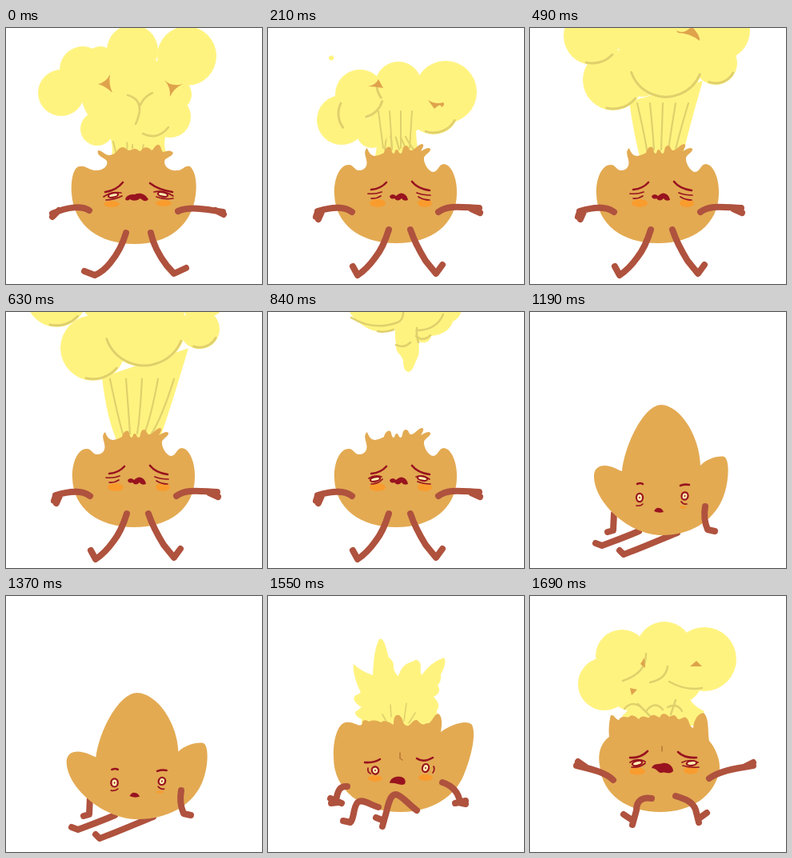
An HTML page with a canvas that plays this animation: 320x320 px, repeating every 1760 ms.

```html
<!DOCTYPE html>
<html lang="en">
<head>
<meta charset="utf-8">
<title>Popping kernel</title>
<style>
html, body { margin: 0; width: 100%; height: 100%; overflow: hidden; background: #fff; }
canvas { display: block; width: 320px; height: 320px; }
</style>
</head>
<body>
<canvas id="stage" width="320" height="320"></canvas>
<script>
const ctx = document.getElementById('stage').getContext('2d');
const C = {
  body: '#e3aa52', puff: '#fff380', shade: '#e0d06c', limb: '#af523e',
  ink: '#98131f', cheek: '#f99c2e', eye: '#fff3b4', spot: '#dfa34c'
};

const fill = (color, d) => { ctx.fillStyle = color; ctx.fill(new Path2D(d)); };
const line = (color, width, d) => {
  ctx.strokeStyle = color;
  ctx.lineWidth = width;
  ctx.stroke(new Path2D(d));
};
const oval = (color, x, y, rx, ry, turn = 0) => {
  ctx.fillStyle = color;
  ctx.beginPath();
  ctx.ellipse(x, y, rx, ry, turn, 0, 7);
  ctx.fill();
};
// Draws with a scale about (cx, cy) and a shift.
function placed(cx, cy, sx, sy, dx, dy, draw) {
  ctx.save();
  ctx.translate(cx + dx, cy + dy);
  ctx.scale(sx, sy);
  ctx.translate(-cx, -cy);
  draw();
  ctx.restore();
}
const lobes = list => list.forEach(([x, y, r]) => oval(C.puff, x, y, r, r));
const arc = ([x, y, r], from, to) => {
  ctx.strokeStyle = C.shade;
  ctx.lineWidth = 3;
  ctx.beginPath();
  ctx.arc(x, y, r - 2, from, to);
  ctx.stroke();
};

// ---- Faces ----
const smallMouth = 'M152 210Q156 206 160 210Q166 204 171 208Q174 210 175 215Q169 217 167 213Q162 218 158 213Q153 215 152 210Z';
const faces = {
  wail: {
    brows: 'M124 205Q138 203 146 193M180 194Q190 202 208 205',
    lines: 'M122 211Q131 204 144 206M125 215Q135 215 145 210M185 205Q196 202 209 210M188 211Q198 215 209 213',
    eyes: [[134, 209, 6, 2.5, -.2], [196, 208, 6, 2.5, .2]],
    mouth: 'M149 214C151 208 157 208 161 208C167 205 174 207 178 214C175 218 171 216 168 213C162 217 158 216 155 214Q151 217 149 214Z',
    cheeks: [[132, 220, 10, 4], [197, 219, 10, 4]]
  },
  shut: {
    brows: 'M129 202Q141 201 148 193M180 192Q187 201 202 203',
    lines: 'M125 207Q134 208 142 205M129 213Q135 214 141 210M186 206Q193 209 203 209M188 211Q194 215 202 215',
    eyes: [],
    mouth: smallMouth,
    cheeks: [[137, 219, 10, 5], [196, 219, 9, 5]]
  },
  dazed: {
    brows: 'M129 202Q141 201 148 193M180 192Q187 201 202 203',
    lines: 'M126 208Q133 203 142 206M129 215Q138 215 143 209M185 206Q194 203 202 209M187 212Q194 215 203 215',
    eyes: [[134, 209, 6, 2.5, -.2], [193, 208, 6, 2.5, .2]],
    mouth: smallMouth,
    cheeks: [[137, 219, 10, 5], [196, 219, 9, 5]]
  },
  tired: {
    brows: 'M134 215Q138 213 141 215M188 217Q193 215 199 216',
    lines: 'M133 242Q138 243 141 240M189 237Q192 241 196 240',
    eyes: [[137, 232, 3.8, 5, 0], [193.5, 230, 3.8, 4.5, .2]],
    mouth: 'M155 249Q158 244 161 245Q165 245 167 250Q161 252 155 249Z',
    cheeks: [[191, 244, 4, 1.5]]
  },
  worry: {
    brows: 'M121 208Q132 209 140 204M186 203Q194 209 206 202',
    lines: 'M125 215Q124 220 128 222M207 213Q209 217 206 221',
    eyes: [[134, 218, 4, 4.4, -.3], [197, 215, 3.8, 4.8, .3]],
    mouth: 'M152 234C153 227 160 225 166 226C171 227 173 231 171 235C165 238 161 233 152 234Z',
    cheeks: [[134, 228, 9, 4], [197, 227, 9, 4]],
    nose: 'M165 196L165 203L168 205'
  },
  howl: {
    brows: 'M125 202Q138 203 147 194M185 195Q193 203 208 202',
    lines: 'M125 208Q134 202 144 207M127 214Q137 215 144 209M190 208Q200 203 210 208M191 212Q200 215 211 214',
    eyes: [[134, 209, 6, 2.7, -.25], [202, 209, 6, 2.7, -.1]],
    mouth: 'M152 215C155 208 161 211 166 209C173 208 179 213 179 219C174 224 169 219 165 221C160 222 160 216 152 215Z',
    cheeks: [[134, 219, 10, 4.5], [201, 218, 9, 4.5]],
    nose: 'M165 188L165 194'
  }
};
function drawFace(f) {
  f.cheeks.forEach(c => oval(C.cheek, ...c));
  if (f.nose) line('#bb7635', 1.5, f.nose);
  line(C.ink, 2.6, f.brows);
  line(C.ink, 1.7, f.lines);
  f.eyes.forEach(([x, y, rx, ry, turn]) => {
    oval(C.ink, x, y, rx + 1.3, ry + 1.3, turn);
    oval(C.eye, x, y, rx - .9, ry - .9, turn);
    if (ry > 4) oval(C.ink, x, y, .8, 1.3);
  });
  fill(C.ink, f.mouth);
}

// ---- Bodies and limbs ----
const poses = {
  blast: {
    body: 'M82 207C81 190 84 174 92 173C99 171 104 178 113 178C122 178 128 172 126 166C121 161 113 160 115 153C120 153 123 158 128 159C133 159 137 157 140 152C144 148 148 148 151 152C154 155 157 151 161 151C166 151 166 156 169 153C172 147 179 149 182 153C185 152 186 145 191 146C195 148 193 154 197 155C201 154 205 152 209 156C207 162 199 161 198 167C198 175 207 179 214 178C221 178 223 171 230 173C237 179 239 195 237 209C232 247 203 270 161 270C116 270 85 247 82 207Z',
    back: '',
    front: 'M104 228C95 222 78 223 58 232M66 228L58 236M215 229C228 223 248 226 271 230M262 228L272 233M150 256C146 270 140 282 130 294Q121 305 111 309L98 304M181 256C184 270 191 284 201 297L210 307L225 300'
  },
  bowl: {
    body: 'M83 208C82 190 89 171 101 171C107 171 108 178 114 178C121 178 125 172 123 165C122 159 119 154 124 150C126 156 129 160 134 160C138 159 142 158 145 156C146 151 150 147 153 149C155 152 154 156 157 157C159 157 158 152 161 152C164 153 163 157 166 157C169 156 167 148 172 147C177 147 175 153 179 153C183 153 187 146 192 145C196 145 194 149 191 154C195 152 200 148 203 151C204 155 196 158 195 162C194 168 200 179 206 180C213 180 213 170 220 170C230 171 237 190 236 208C235 245 205 269 160 269C115 269 84 245 83 208Z',
    back: '',
    front: 'M105 230C94 222 79 224 62 229M67 230L63 239M62 230L60 236M213 230C225 221 240 224 264 225M254 226L265 231M151 252C147 265 142 277 134 287Q124 301 112 309L106 298M178 252C182 264 189 278 197 291L210 307L218 296'
  },
  bud: {
    body: 'M80 207C79 193 90 190 100 193C108 195 111 198 115 199C119 164 143 116 164 116C188 117 212 155 213 192C220 184 235 179 243 181C250 185 249 215 240 235C228 262 200 279 165 279C125 279 82 240 80 207Z',
    back: 'M105 252L104 273L97 275M136 274C120 281 106 286 90 292L82 289M184 276C164 284 139 295 117 303L112 298',
    front: 'M219 243C217 254 219 265 222 272L231 274'
  },
  sprout: {
    body: 'M82 202C81 178 88 159 97 158C108 156 113 165 118 160C117 155 122 154 126 157C133 154 137 156 141 158C146 154 151 158 157 161C157 153 158 148 164 149C170 153 167 160 173 162C178 164 180 154 186 155C190 158 192 163 198 159C205 161 206 148 213 147C219 151 217 164 216 170C229 160 249 154 255 161C261 174 253 204 245 223C234 251 204 270 166 270C118 270 82 243 82 202Z',
    back: '',
    front: 'M138 264C126 260 117 253 112 258C106 265 108 278 103 283L94 281M99 238C90 237 87 243 85 256M78 253L92 259M79 259L88 258M218 233C230 237 238 244 240 258M247 256L234 259M247 260L238 258M186 268C175 260 167 249 160 248C151 248 150 265 146 277L143 288M145 281L135 277'
  },
  burst: {
    body: 'M87 211C84 192 92 181 99 176C98 167 99 156 101 149C106 148 106 154 111 155C115 148 120 153 124 151C128 147 132 151 136 154C141 147 145 153 149 152C153 146 158 150 162 152C165 145 170 147 174 151C179 149 181 147 184 153C188 157 192 148 196 153C199 155 199 164 204 165C205 154 210 147 217 146C224 152 222 169 224 181C232 190 238 205 237 217C231 250 202 270 163 270C122 270 90 249 87 211Z',
    back: '',
    front: 'M104 230C95 221 80 217 58 212M70 214L60 207M224 228C237 219 253 216 279 212M269 213L279 208M152 253C140 251 133 256 133 268L128 286M129 281L117 273M182 250C195 254 203 257 207 267L211 283M210 279L221 271'
  }
};
function drawFigure(name, face, sx = 1, sy = 1) {
  const p = poses[name];
  line(C.limb, 8, p.back);
  placed(165, 279, sx, sy, 0, 0, () => {
    fill(C.body, p.body);
    drawFace(faces[face]);
  });
  line(C.limb, 8, p.front);
}

// ---- Clouds ----
const firstLobes = [[69, 81, 29], [96, 52, 29], [118, 40, 17], [158, 28, 32], [226, 35, 37], [212, 83, 20],
  [188, 77, 36], [205, 111, 26], [114, 126, 21], [140, 82, 46], [165, 116, 30]];
function firstCloud() {
  lobes(firstLobes);
  line(C.shade, 2.6, 'M152 84Q168 88 167 104Q165 114 162 120M167 98Q172 86 183 81M171 132Q190 141 203 124');
  fill(C.spot, 'M115 70Q125 68 130 58Q128 70 133 81Q125 73 115 70ZM198 65Q207 74 221 70Q210 75 205 86Q206 74 198 65Z');
}
function firstColumn() {
  fill(C.puff, 'M122 120Q136 140 132 163L203 163Q192 142 206 120Z');
  line(C.shade, 2, 'M134 142L138 158M148 131Q153 143 151 154M159 131L158 150M174 132L171 150');
}

const ringLobes = [[92, 115, 31], [115, 83, 31], [163, 71, 29], [222, 80, 39], [207, 101, 32], [130, 131, 19], [163, 98, 38]];
const towerLobes = [[104, 65, 38], [78, 10, 36], [150, -5, 50], [238, 3, 37], [232, 44, 27], [140, 58, 28], [170, 40, 48]];
// k = 0 is the young puff, k = 1 the tall tower.
function tower(k) {
  const mix = (a, b) => a + (b - a) * k;
  const list = ringLobes.map((l, i) => l.map((v, j) => mix(v, towerLobes[i][j])));
  const left = mix(134, 124), right = mix(186, 216);
  const top = mix(118, 92), topRight = mix(118, 66);
  fill(C.puff, `M${left} ${top}Q${left + 6} 135 ${mix(133, 138)} 164L190 164Q${mix(183, 196)} 135 ${right} ${topRight}Z`);
  for (let i = 0; i < 5; i++) {
    const x = left + 10 + (right - left - 28) * i / 4;
    line(C.shade, 2.2, `M${x} ${top + 2}Q${x + (162 - x) * .3} 130 ${146 + 9 * i} 152`);
  }
  lobes(list);
  const [l, ul, mid, , r, , core] = list;
  arc(r, .5, 1.9);
  if (k < .6) {
    arc(ul, .3, 1.3);
    arc(mid, 2.5, 3.1);
    arc([l[0] + 25, l[1] - 8, l[2]], 2.5, 3.6);
    for (let i = 0; i < 4; i++) line(C.shade, 2, `M${138 + 14 * i} ${top - 14}L${144 + 11 * i} 150`);
  } else {
    arc(core, .4, 2.8);
    arc(l, .7, 1.8);
    arc(ul, .75, 1.8);
  }
  const sx = mix(125, 180), sy = mix(73, 7);
  if (k < .6) fill(C.spot, `M${sx} ${sy}Q${sx + 10} ${sy - 2} ${sx + 13} ${sy - 9}L${sx + 19} ${sy + 2}Q${sx + 8} ${sy} ${sx} ${sy}Z`);
  const qx = mix(200, 183), qy = mix(90, 3);
  fill(C.spot, `M${qx} ${qy}Q${qx + 9} ${qy + 6} ${qx + 19} ${qy + 3 - 8 * k}Q${qx + 22 + 8 * k} ${qy + 6} ${qx + 17 + 12 * k} ${qy + 9 + 4 * k}Q${qx + 16} ${qy + 3} ${qx + 8 - 6 * k} ${qy + 11 - 8 * k}Z`);
}

function tail(dy) {
  placed(0, 0, 1, 1, 0, dy, () => {
    lobes([[100, -55, 50], [170, -62, 75], [238, -55, 50]]);
    fill(C.puff, 'M98 -8C104 6 113 15 128 22C139 26 151 25 159 22C158 31 160 36 160 43C160 52 167 52 169 61C169 70 171 74 176 75C182 73 183 64 187 57C190 51 188 42 189 37C198 41 203 35 204 30C222 28 228 20 231 12C238 8 242 3 243 -8Z');
    line(C.shade, 2.5, 'M104 7Q132 24 162 13Q170 10 169 -3M160 41Q170 46 178 38M185 30Q194 38 203 29M188 38Q185 31 186 20M187 23Q211 22 219 3M137 24Q147 26 157 22');
  });
}

function flame() {
  fill(C.puff, 'M117 162L117 154Q108 150 109 145L117 139Q105 132 108 125L116 121Q105 97 107 85Q116 94 131 99Q132 67 139 54Q144 51 148 66L151 77Q158 81 157 91Q160 99 163 100Q168 84 181 82Q187 76 191 86Q190 95 192 99Q203 83 220 77Q224 83 216 98Q217 106 212 112Q218 120 207 126Q217 136 211 143L212 154L200 165Z');
  line(C.shade, 1.6, 'M143 148L148 157M153 136L154 151M173 134L170 156M184 146L176 159');
}
function cap() {
  fill(C.puff, 'M121 130Q128 140 115 150L124 162L205 162L218 144Q197 134 198 120Z');
  lobes([[93, 110, 33], [115, 75, 33], [168, 67, 35], [218, 79, 40], [186, 105, 29], [125, 118, 25], [155, 100, 35]]);
  line(C.shade, 2.5, 'M145 72Q146 96 116 106M172 88Q170 104 150 108M174 107Q195 119 215 115M118 141Q127 130 139 139M145 144Q156 130 166 142M172 139Q184 133 190 144M135 135L150 150M182 130L176 148');
  fill(C.spot, 'M138 85L143 77L144 90ZM200 88L208 81L215 88ZM125 115L134 117L127 124Z');
}

// ---- Timeline: start time and drawing of each held pose ----
const bowl = face => drawFigure('bowl', face);
const grow = k => () => { tower(k); bowl('shut'); };
const leave = dy => () => { tail(dy); bowl('dazed'); };
const steps = [
  [0, () => { firstColumn(); firstCloud(); drawFigure('blast', 'wail'); }],
  [70, () => {
    firstColumn();
    placed(155, 140, 1.2, 1.2, 0, -18, firstCloud);
    drawFigure('blast', 'wail');
  }],
  [140, () => {
    placed(155, 140, 1.15, 1.1, 0, -125, firstCloud);
    placed(162, 157, .82, .78, 0, 0, () => tower(0));
    bowl('shut');
  }],
  [210, () => {
    fill(C.puff, 'M76 36L80 34L83 37L80 41L76 39Z');
    grow(0)();
  }],
  [280, grow(.25)],
  [350, grow(.5)],
  [420, grow(.75)],
  [490, grow(1)],
  [560, grow(1.2)],
  [630, grow(1.4)],
  [700, leave(72)],
  [770, leave(36)],
  [840, leave(0)],
  [910, leave(-38)],
  [980, () => bowl('dazed')],
  [1050, () => drawFigure('bud', 'tired', 1.04, .84)],
  [1120, () => drawFigure('bud', 'tired', .98, .95)],
  [1190, () => drawFigure('bud', 'tired')],
  [1370, () => drawFigure('bud', 'tired', 1.05, .97)],
  [1550, () => { flame(); drawFigure('sprout', 'worry'); }],
  [1620, () => { placed(163, 157, .86, .84, 0, 0, cap); drawFigure('burst', 'howl'); }],
  [1690, () => { cap(); drawFigure('burst', 'howl'); }]
];
const LOOP = 1760;
const start = performance.now();
let shown = -1;

function tick() {
  const t = (performance.now() - start) % LOOP;
  let i = steps.length - 1;
  while (steps[i][0] > t) i--;
  if (i !== shown) {
    shown = i;
    ctx.fillStyle = '#fff';
    ctx.fillRect(0, 0, 320, 320);
    steps[i][1]();
  }
  requestAnimationFrame(tick);
}
ctx.lineCap = ctx.lineJoin = 'round';
tick();
</script>
</body>
</html>
```
